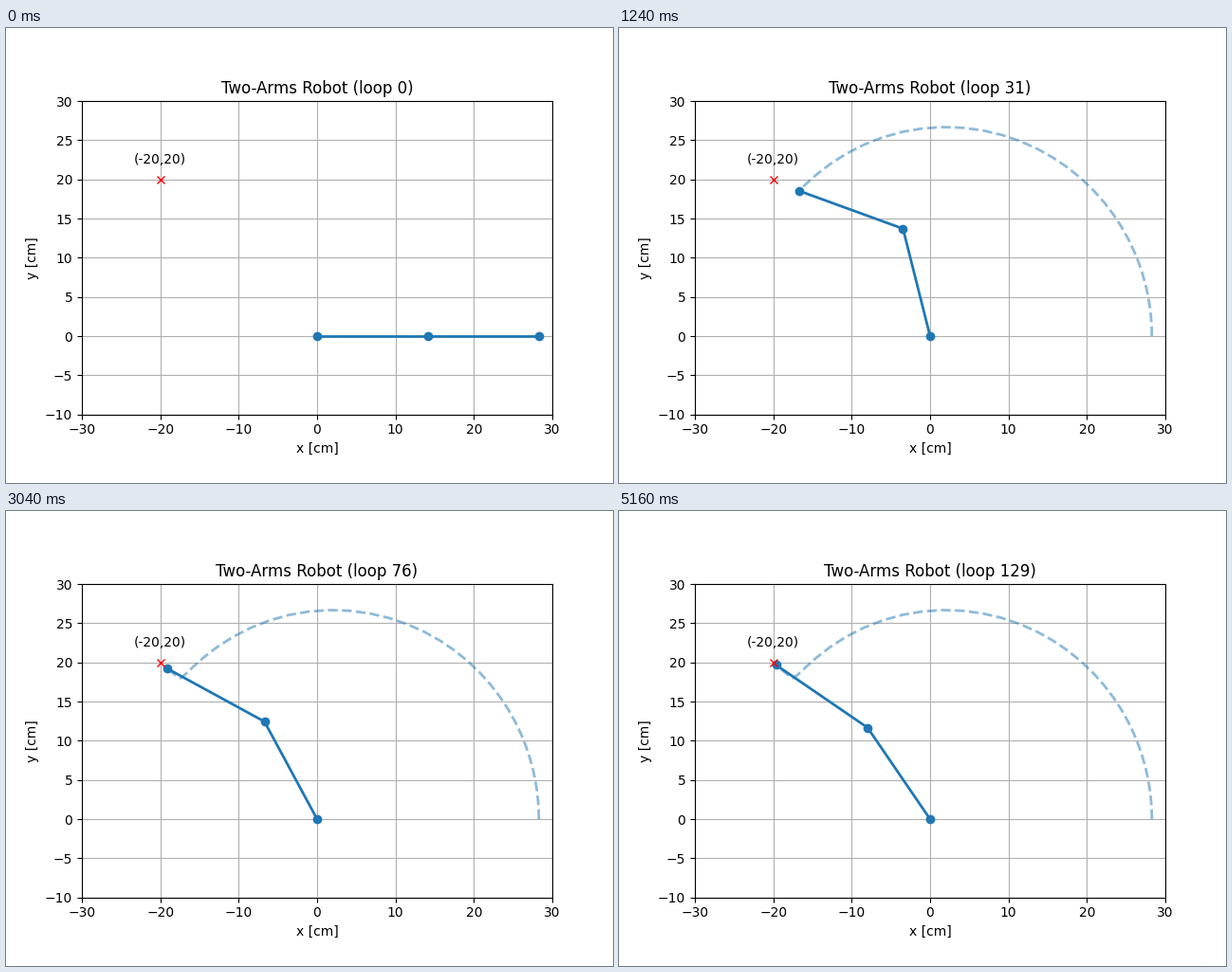
Recreate the animation shown at these times as a matplotlib script. Size 640 px wide and 480 px high, loop 5200 ms.

```python
import numpy as np
import matplotlib.pyplot as plt
from matplotlib.animation import FuncAnimation

FRAMES, INTERVAL = 130, 40
ARM = 10 * np.sqrt(2)
GOAL = np.array([-20.0, 20.0])
GAIN = 0.00304


def joints(q):
    """Base, elbow and hand positions for the joint angles q."""
    angles = np.cumsum(q)
    steps = ARM * np.column_stack([np.cos(angles), np.sin(angles)])
    return np.vstack([[0, 0], np.cumsum(steps, axis=0)])


def step(q):
    """One Jacobian-transpose step, at near constant speed until close."""
    _, elbow, hand = joints(q)
    error = GOAL - hand
    dist = np.hypot(*error)
    pull = error / (dist + 0.775 * np.exp(-(dist / 9) ** 2))
    lever = hand - elbow
    jac = np.array([[-hand[1], -lever[1]], [hand[0], lever[0]]])
    return q + GAIN * jac.T @ pull


def simulate():
    q, poses = np.zeros(2), []
    for _ in range(FRAMES):
        poses.append(joints(q))
        q = step(q)
    return np.array(poses)


poses = simulate()

fig, ax = plt.subplots(figsize=(6.4, 4.8), dpi=100)
ax.set_aspect("equal")
ax.set(xlim=(-30, 30), ylim=(-10, 30), xlabel="x [cm]", ylabel="y [cm]",
       xticks=np.arange(-30, 31, 10), yticks=np.arange(-10, 31, 5))
ax.grid()

trace, = ax.plot([], [], "--", color="C0", lw=2, alpha=0.5)
arm, = ax.plot([], [], "o-", color="C0", lw=2)
ax.plot(*GOAL, "rx")
ax.text(GOAL[0], GOAL[1] + 2, "(-20,20)", ha="center")
title = ax.set_title("")


def update(n):
    arm.set_data(*poses[n].T)
    trace.set_data(*poses[:n + 1, 2].T)
    title.set_text(f"Two-Arms Robot (loop {n})")
    return arm, trace, title


anim = FuncAnimation(fig, update, frames=FRAMES, interval=INTERVAL,
                     repeat=True, repeat_delay=0, blit=False)
plt.show()
```
